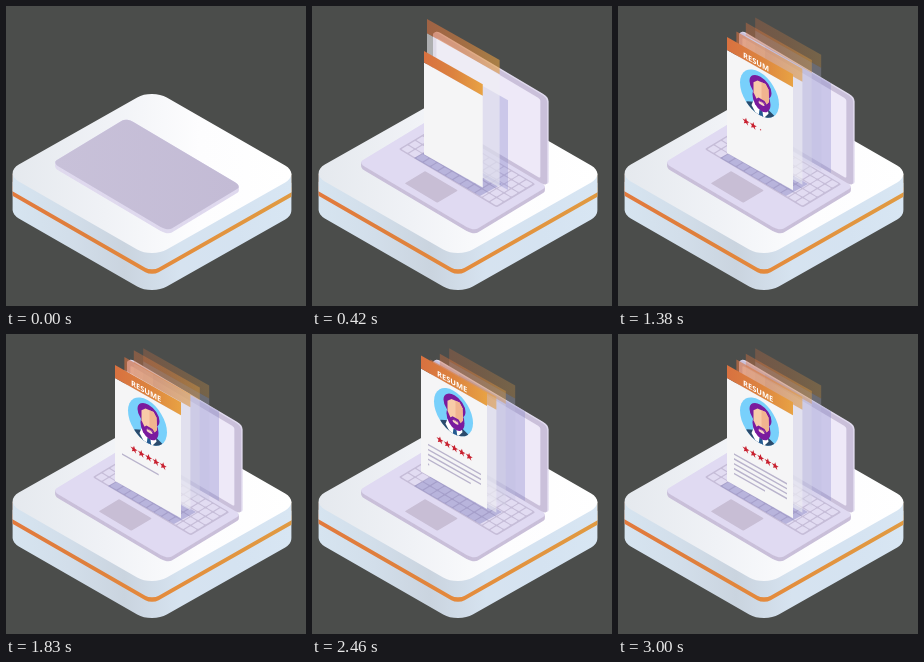
Recreate the animation shown at these times as an HTML page with a canvas. Size 300x300 px, loop 3.63 s.

```html
<!DOCTYPE html>
<html lang="en">
<head>
<meta charset="utf-8">
<style>
html, body { margin: 0; width: 100%; height: 100%; overflow: hidden; background: #4b4d4b; }
canvas { display: block; width: 300px; height: 300px; }
</style>
</head>
<body>
<canvas width="300" height="300"></canvas>
<script>
const ctx = document.querySelector('canvas').getContext('2d');
const SLOPE = .565, W = 66, H = 116, HEAD = 13;

const ramp = (t, start, length) => Math.min(1, Math.max(0, (t - start) / length));
const easeOut = p => 1 - (1 - p) ** 2;
const easeInOut = p => (1 - Math.cos(Math.PI * p)) / 2;
const mix = (a, b, p) => a + (b - a) * p;

function gradient(x0, x1, ...colors) {
  const g = ctx.createLinearGradient(x0, 0, x1, 0);
  colors.forEach((c, i) => g.addColorStop(i / (colors.length - 1), c));
  return g;
}
function fill(path, color) {
  ctx.fillStyle = color;
  ctx.fill(path);
}
function plate(matrix, x, y, w, h, r) {
  const box = new Path2D(), path = new Path2D();
  box.roundRect(x, y, w, h, r);
  path.addPath(box, new DOMMatrix(matrix));
  return path;
}
function poly(color, ...xy) {
  ctx.beginPath();
  for (let i = 0; i < xy.length; i += 2) ctx.lineTo(xy[i], xy[i + 1]);
  ctx.closePath();
  ctx.fillStyle = color;
  ctx.fill();
}
function ellipse(color, x, y, rx, ry) {
  ctx.beginPath();
  ctx.ellipse(x, y, rx, ry, 0, 0, 7);
  ctx.fillStyle = color;
  ctx.fill();
}

const white = gradient(7, 286, '#e5e9ee', '#f0f2f6', '#fdfdfe', '#ffffff');
const side = gradient(7, 286, '#d6e4f0', '#d2deea', '#cad4df', '#d6e3f0', '#d5e3f1', '#d8e6f3');
const stripe = gradient(7, 286, '#e27a3d', '#df7f3c', '#e48a3c', '#e2943f', '#e09a42');
const orange = gradient(0, W, '#d87140', '#dc833f', '#e8a243');

function platform() {
  const slab = (dy, r) => plate([1.48, .85, -1.48, .84, 146, 83 + dy], 0, 0, 100, 100, r);
  const hull = (depth, r) => {
    const path = slab(depth, r);
    path.rect(6.6, 167.5, 278.8, depth);
    return path;
  };
  const body = hull(37, 10);
  fill(body, side);
  ctx.save();
  ctx.clip(body);
  fill(hull(18, 4.5), stripe);
  fill(hull(13.5, 4.5), side);
  ctx.restore();
  fill(slab(0, 10), white);
}

function laptop(open) {
  const base = (dy, ...box) => plate([1.13, .67, -.73, .44, 121, 113 + dy], ...box);
  for (let dy = 4; dy > 0; dy--) fill(base(dy, -1, -1, 102, 102, 6), open > .4 ? '#c9bfd9' : '#dfd9ee');
  fill(base(0, -1, -1, 102, 102, 6), '#e0daf2');
  fill(base(0, 7, 5, 87, 53, 2), '#c6bdd8');
  for (let row = 0; row < 5; row++)
    for (let col = 0; col < 13; col++)
      fill(base(0, 8.2 + col * 6.55, 6.5 + row * 10.2, 5.6, 8.8, 1), '#e2dcf2');
  fill(base(0, 35, 65, 29, 28, 1), '#c8bed5');

  const angle = open * Math.PI / 2, c = Math.cos(angle), s = Math.sin(angle);
  const lid = (dx, dy, ...box) =>
    plate([1.13, .67, -.73 * c, .44 * c - .88 * s, 121 + dx, 113 + dy], ...box);
  if (c > s) {
    fill(lid(0, 0, -1, -1, 102, 102, 6), gradient(48, 234, '#c8c1d9', '#c3bbd5'));
  } else {
    fill(lid(1.5, -.6, 0, 0, 101, 101, 5), '#e0daee');
    fill(lid(0, 0, 0, 0, 101, 101, 5), '#cac0da');
    fill(lid(0, 0, 3, 5, 92, 90, 2), '#eee9f8');
  }
}

function sheet(x, y, scale, alpha, paper, content) {
  ctx.save();
  ctx.globalAlpha = alpha;
  ctx.transform(scale, SLOPE * scale, 0, scale, x, y);
  ctx.fillStyle = paper;
  ctx.fillRect(0, HEAD, W, H - HEAD);
  ctx.fillStyle = orange;
  ctx.fillRect(0, 0, W, HEAD);
  if (content) content();
  ctx.restore();
}

function portrait(t) {
  const size = easeOut(ramp(t, 600, 330));
  if (!size) return;
  ctx.save();
  ctx.translate(32.5, 38.2);
  ctx.scale(size, size);
  ctx.beginPath();
  ctx.ellipse(0, 0, 19.5, 21.5, 0, 0, 7);
  ctx.fillStyle = '#78d0fb';
  ctx.fill();
  ctx.clip();
  ctx.translate(0, 48 * (1 - easeOut(ramp(t, 750, 360))));
  poly('#2a4a6c', -16, 24, -13, 15, -5, 11, 8, 11, 15, 14, 18, 24);
  poly('#ffffff', -6, 10, 8, 10, 9, 15, 3, 24, -2, 24, -8, 16);
  poly('#245a91', 0, 16, 3, 16, 4, 24, -1, 24);
  // Hair and beard, then the face over them
  ellipse('#7a1b9e', 1, -7, 11, 10.5);
  ellipse('#7a1b9e', 2, 5, 9, 11.5);
  poly('#f8cba8', -6, -8, -2, -12, 6, -13, 9, -9, 9.5, 3, 7, 7, -3, 7, -6, 2);
  poly('#f1b48f', 2, -12.5, 6, -13, 9, -9, 9.5, 3, 7, 7, 2, 7);
  poly('#7a1b9e', -4, 8, -1, 4.6, 5, 4.6, 8, 8, 4, 7, 0, 7);
  ellipse('#f8d5c4', 2, 9, 3, 1.4);
  ctx.restore();
}

function star(x, y, r) {
  const points = [];
  for (let i = 0; i < 10; i++) {
    const a = i * Math.PI / 5, d = i % 2 ? r * .42 : r;
    points.push(x + d * Math.sin(a), y - d * Math.cos(a));
  }
  poly('#c8202f', ...points);
}

function title(t) {
  ctx.font = 'bold 7.5px "Open Sans", sans-serif';
  ctx.textAlign = 'center';
  ctx.fillStyle = '#ffffff';
  let x = 16;
  [...'RESUME'].forEach((letter, i) => {
    const width = ctx.measureText(letter).width;
    const size = ramp(t, 780 + 120 * i, 120);
    if (size) {
      ctx.save();
      ctx.translate(x + width / 2, 8.5);
      ctx.scale(size, size);
      ctx.fillText(letter, 0, 2.7);
      ctx.restore();
    }
    x += width;
  });
}

function resume(t) {
  title(t);
  portrait(t);
  for (let i = 0; i < 5; i++) star(19 + 7.3 * i, 73.8, 3.7 * ramp(t, 1110 + 120 * i, 120));
  ctx.fillStyle = '#b9b3cc';
  [53, 53, 53, 53, 31].forEach((width, i) =>
    ctx.fillRect(7, 84.2 + 4.9 * i, width * ramp(t, 1650 + 200 * i, 260), 1.6));
}

function papers(t) {
  const rise = easeOut(ramp(t, 240, 360));
  if (!rise) return;
  const lift = easeOut(ramp(t, 240, 180));
  const fan = easeInOut(ramp(t, 420, 360));
  // The sheets bob one after another, from the back to the front
  const bob = k => -11 * Math.sin(Math.PI * ramp(t, 2190 - 470 * k, 720)) ** 2;

  // Shade on the screen and the keyboard
  const x = mix(130, 147, fan), y = mix(57, 40, fan);
  ctx.globalAlpha = lift;
  poly('rgba(128,128,198,.32)', x, y, x + W, y + W * SLOPE, x + W, y + 127, x, y + 90);
  poly('rgba(98,98,172,.33)', 102, 152, 168, 190, 190, 178, 124, 140);
  ctx.globalAlpha = 1;

  for (let k = 3; k; k--) {
    const gx = mix(mix(121, 115, lift), 109 + 9.4 * k, fan);
    const gy = mix(mix(87, 13, lift), 31 - 5.6 * k, fan) + bob(k);
    const scale = mix(mix(.56, 1.1, lift), 1, fan);
    const alpha = [0, .6, .4, .27][k] * (k > 1 ? fan : lift);
    sheet(gx, gy, scale, alpha, ['', '#eeeef3', '#d4d4e6', '#bdbedc'][k]);
  }

  sheet(mix(121, 109, rise), mix(87, 31, rise) + bob(0), mix(.56, 1, rise),
    ramp(t, 240, 90), '#f5f5f6', () => resume(t));
}

function draw(now) {
  const t = Math.min(3000, Math.floor(now % 3630 / 30) * 30);
  ctx.fillStyle = '#4b4d4b';
  ctx.fillRect(0, 0, 300, 300);
  platform();
  laptop(easeInOut(ramp(t, 0, 360)));
  papers(t);
  requestAnimationFrame(draw);
}
requestAnimationFrame(draw);
</script>
</body>
</html>
```
